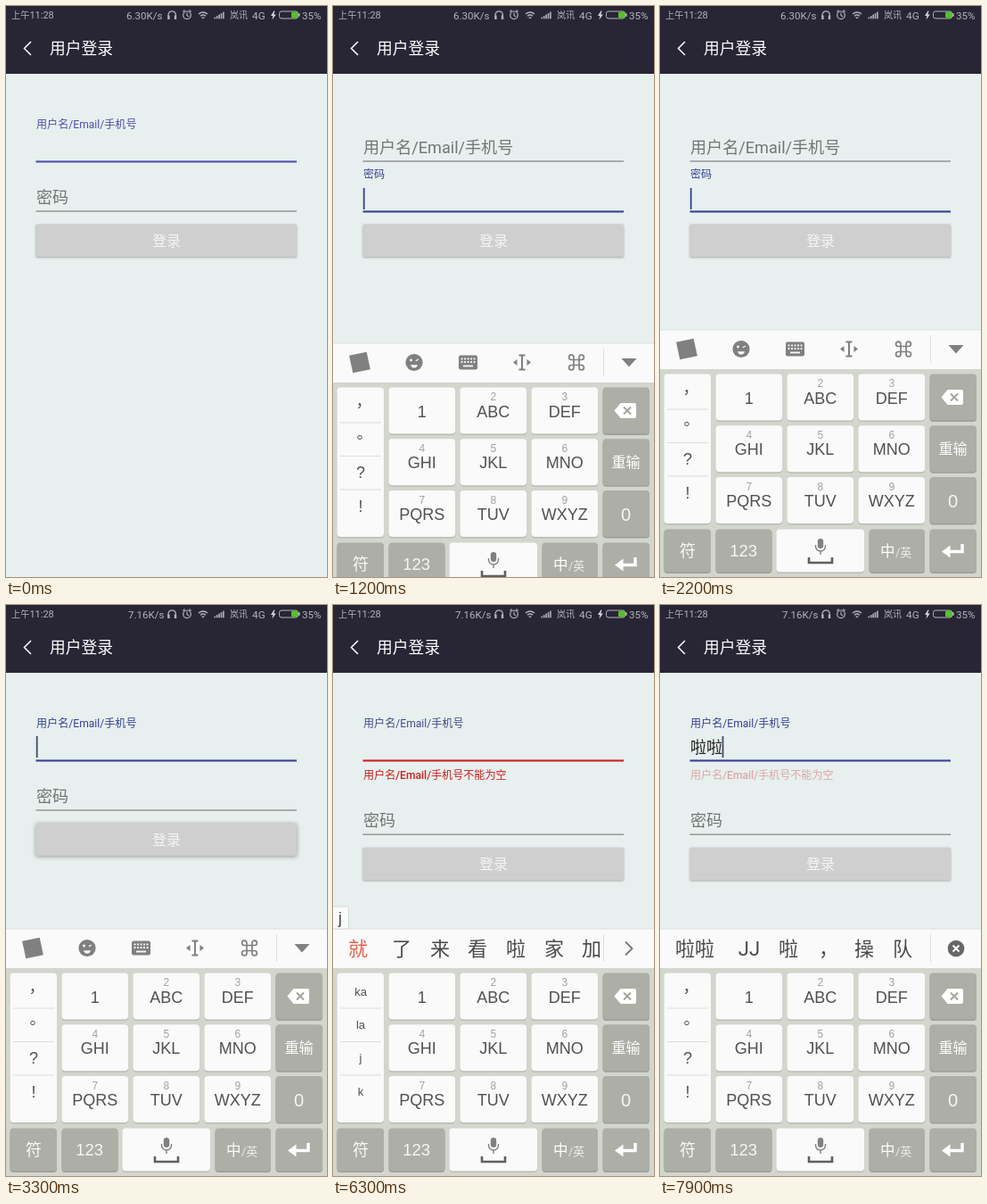
Write an HTML page that moves like this. It is 360 px wide and 640 px high and loops after 8000 ms.

```html
<!DOCTYPE html>
<html lang="zh-CN">
<head>
<meta charset="utf-8">
<title>用户登录</title>
<style>
html, body { margin: 0; width: 100%; height: 100%; overflow: hidden; background: #e7f0ee; }
svg { display: block; width: 360px; height: 640px; }
text { font-family: Roboto, "Noto Sans CJK SC", "Noto Sans CJK", sans-serif; white-space: pre; }
.key { font-family: "Liberation Sans", "Noto Sans CJK SC", "Noto Sans CJK", sans-serif; }
#error { font-weight: 500; }
#button rect { filter: drop-shadow(0 1px 1px rgba(0, 0, 0, .3)); }
#button.down rect { filter: drop-shadow(0 1.5px 2.5px rgba(0, 0, 0, .36)); }
</style>
</head>
<body>
<svg id="stage" viewBox="0 0 360 640"></svg>
<script>
const LOOP = 8000, STEP = 100;
const BLUE = '#36409a', INK = '#454b8c', RED = '#cc1f1f', GREY = '#727675', ICON = '#808080';

// y is the optical middle of the text
const text = (x, y, size, str, fill, o = {}) =>
  `<text x="${x}" y="${y + size * .37}" font-size="${size}" fill="${fill}"` +
  ` text-anchor="${o.anchor || 'middle'}" class="${o.cls || ''}" id="${o.id || ''}">${str}</text>`;
const left = (x, y, size, str, fill, id) => text(x, y, size, str, fill, { anchor: 'start', id });
const rect = (x, y, w, h, fill, extra = '') =>
  `<rect x="${x}" y="${y}" width="${w}" height="${h}" fill="${fill}" ${extra}/>`;
const path = (d, stroke, w = 1, fill = 'none') =>
  `<path d="${d}" fill="${fill}" stroke="${stroke}" stroke-width="${w}"/>`;
const circle = (x, y, r, fill, extra = '') =>
  `<circle cx="${x}" cy="${y}" r="${r}" fill="${fill}" ${extra}/>`;
const group = (id, body) => `<g id="${id}">${body}</g>`;

function statusBar() {
  const c = '#b4b3b9';
  let s = left(6, 10.5, 10.2, '上午<tspan font-size="11">11:28</tspan>', c);
  s += left(135, 10.5, 11.5, '', c, 'speed');
  s += path('M182 12V10a4.2 4.2 0 0 1 8.4 0v2', c, 1.2) + rect(181.2, 10.5, 2.4, 4.5, c) + rect(188.8, 10.5, 2.4, 4.5, c);
  s += path('M203 7.5V10.5L205 12M198.5 6.5l2-2M207.5 6.5l-2-2', c, 1.1) +
    circle(203, 10.3, 4.3, 'none', `stroke="${c}" stroke-width="1.2"`);
  s += path('M216 9q5-4 10 0M218 11.2q3-2.4 6 0', c, 1.4) + path('M219 12.4h4l-2 2.2z', 'none', 0, c);
  for (let i = 0; i < 5; i++) s += rect(233.5 + i * 2.4, 12.6 - i * 1.5, 1.6, 1.7 + i * 1.5, c);
  s += left(251, 10.5, 10, '岚讯', c) + left(276, 10.5, 11.8, '4G', c);
  s += path('M300.5 5.5l-3.5 5.4h2.4l-1 4.6 4.4-6h-2.6l1.4-4z', 'none', 0, '#d8d8dc');
  s += rect(306.5, 6, 21, 8, 'none', `rx="2.5" stroke="${c}"`) + rect(320, 6.5, 7.5, 7, '#55c02c', 'rx="1.5"') + rect(328, 8.2, 1.6, 3.6, c);
  return s + left(332, 10.5, 11.5, '35%', c);
}

function form() {
  return rect(33.5, 0, 292.5, 2, BLUE, 'id="lineUser"') +
    left(34, 0, 12, '用户名/Email/手机号', BLUE, 'labelUser') +
    left(34, 159, 18, '', '#222', 'typed') +
    left(34, 190.5, 12.1, '用户名/Email/手机号不能为空', RED, 'error') +
    group('lower',
      rect(33.5, 0, 292.5, 2, BLUE, 'id="linePass"') +
      left(34, 0, 12, '密码', BLUE, 'labelPass') +
      group('button', rect(33.5, 244.5, 292.5, 36.5, '#cfcfcf', 'rx="1.5"') +
        text(180, 263, 16, '登录', '#f2f6f5'))) +
    rect(34, 0, 1.8, 24, BLUE, 'id="cursor"');
}

function key(x, y, w, h, dark, id = '') {
  return rect(x, y + 1.4, w, h, dark ? '#9c9e96' : '#b8bcb3', 'rx="4"') +
    rect(x, y, w, h, dark ? '#adaea6' : '#f9faf9', `rx="4" id="${id}"`);
}
const keyText = (x, y, size, str, fill = '#505050') => text(x, y, size, str, fill, { cls: 'key' });

function tools() {
  let s = rect(20, 374.5, 20, 20, ICON, 'transform="rotate(-12 30 384.5)"');
  s += circle(91, 384.5, 9.6, ICON) + circle(87.5, 382, 1.4, '#f9f9f9') +
    path('M92.8 382.8l3-1.8', '#f9f9f9', 1.3) + path('M87 387.2h8q-1 3.4-4 3.4t-4-3.4z', 'none', 0, '#f9f9f9');
  s += rect(141, 376.5, 21, 16, ICON, 'rx="2"');
  for (let r = 0; r < 2; r++) for (let i = 0; i < 5; i++) s += rect(143.6 + i * 3.5, 379.5 + r * 3.6, 1.9, 1.9, '#f9f9f9');
  s += rect(146, 387.6, 11, 1.8, '#f9f9f9');
  s += path('M208.5 376.5h7M212 376.5v16M208.5 392.5h7', ICON, 2) +
    path('M206.5 381v7l-4.5-3.5zM217.5 381v7l4.5-3.5z', 'none', 0, ICON);
  const loops = [[-1, -1], [1, -1], [-1, 1], [1, 1]].map(([a, b]) =>
    `M${273 + a * 3} ${384.5 + b * 3}h${a * 2.7}a2.7 2.7 0 1 ${a === b ? 1 : 0} ${-a * 2.7} ${b * 2.7}z`).join('');
  s += path(loops + 'M270 381.5h6v6h-6z', ICON, 1.7);
  return s + path('M323.5 380h17l-8.5 9.5z', 'none', 0, ICON);
}

function keyboard() {
  let s = rect(0, 363, 360, 44, '#f9faf9') + rect(0, 362.5, 360, 1, '#dde2df') + rect(0, 407, 360, 233, '#d2d6cd');
  s += rect(303, 369, 1, 31, '#dedede');
  s += group('tools', tools()) + group('words', '');
  s += group('more', path('M328 377.5l7.5 7.5-7.5 7.5', '#757575', 1.8));
  s += group('close', circle(332, 385, 9.3, '#666') + path('M328.5 381.5l7 7M335.5 381.5l-7 7', '#fff', 1.9));
  s += group('compose', rect(-2, 338, 19.5, 25, '#f9faf9', 'rx="2" stroke="#d5dad7" id="composeBox"') +
    `<text id="composeText" class="key" x="6" y="357" font-size="18" fill="#444"></text>`);

  s += key(4.5, 412.5, 52.5, 167.5);
  for (const y of [451.5, 489, 526.5]) s += rect(8, y, 46, 1, '#dcdfdb');
  s += group('marks',
    `<text x="25.5" y="433.5" font-size="18" fill="#505050">，</text>` +
    `<text x="26.5" y="469.5" font-size="18" fill="#505050">。</text>` +
    keyText(31, 507.5, 18, '?') + keyText(31, 545, 18, '!'));
  s += group('syllables', ['ka', 'la', 'j', 'k'].map((v, i) => keyText(31, 433 + i * 37.3, 13, v)).join(''));

  ['1', 'ABC', 'DEF', 'GHI', 'JKL', 'MNO', 'PQRS', 'TUV', 'WXYZ'].forEach((name, i) => {
    const x = 62.5 + i % 3 * 80, y = 412.5 + Math.floor(i / 3) * 57.8;
    s += key(x, y, 74.5, 52, false, 'key' + name);
    if (i) s += keyText(x + 37.3, y + 10, 12, i + 1, '#a2a2a2');
    s += keyText(x + 37.3, y + 26.4, 18, name);
  });
  for (let i = 0; i < 3; i++) s += key(302.5, 412.5 + i * 57.8, 52.5, 52, true);
  s += path('M315.5 438.5l7-8.5h15.5q2 0 2 2v13q0 2-2 2h-15.5z', 'none', 0, '#fff') + path('M326 434.5l8 8M334 434.5l-8 8', '#a3a49c', 2);
  s += `<g font-weight="500">${text(328.5, 496.5, 16, '重输', '#fff')}</g>` + keyText(328.5, 554.5, 20, '0', '#f6f6f4');

  s += key(4.5, 586.5, 52.5, 48, true) + text(31, 610.5, 18, '符', '#f8f8f6');
  s += key(62.5, 586.5, 63, 48, true) + keyText(93.7, 610, 18.5, '123', '#f6f6f4');
  s += key(130.5, 586.5, 98.5, 48);
  s += rect(176.8, 597, 6.4, 11, ICON, 'rx="3.2"') + path('M174.5 604v1.5a5.5 5.5 0 0 0 11 0V604M180 611v4', ICON, 1.4);
  s += path('M167 618v6h26v-6', '#606060', 2.6);
  s += key(234.5, 586.5, 62.5, 48, true) + left(247, 610.5, 16.5, '中', '#fff') + left(264, 612, 13, '/英', '#ececea');
  s += key(302.5, 586.5, 52.5, 48, true);
  return s + path('M339 603v8.5h-15', '#fff', 3.4) + path('M325.5 604.5v14l-9.5-7z', 'none', 0, '#fff');
}

document.getElementById('stage').innerHTML =
  rect(0, 0, 360, 640, '#e7f0ee') + form() +
  rect(0, 0, 360, 76, '#282635') + statusBar() +
  path('M28 40l-7.5 7.5 7.5 7.5', '#fff', 1.5) + left(49, 47.6, 17.8, '用户登录', '#fff') +
  group('keyboard', keyboard());

const $ = id => document.getElementById(id);
const set = (id, attrs) => { for (const k in attrs) $(id).setAttribute(k, attrs[k]); };
const show = (id, on) => set(id, { visibility: on ? 'visible' : 'hidden' });
const ramp = (t, start, dur = 200) => Math.min(1, Math.max(0, (t - start) / dur));
const within = (t, a, b) => t >= a && t < b;

// [from, composed letters, [word, centre]...]
const WORDS = [
  [0, ''],
  [6000, 'j', ['就', 28], ['了', 77], ['来', 120], ['看', 162], ['啦', 205], ['家', 248], ['加', 290]],
  [6700, 'la', ['啦', 28], ['拉', 77], ['家', 120], ['卡', 162], ['加', 205], ['来', 248], ['辣', 290]],
  [7400, 'lala', ['啦啦', 39], ['拉拉', 100], ['啦', 157], ['拉', 200], ['家', 243], ['卡', 285]],
  [7800, '', ['啦啦', 39], ['JJ', 100], ['啦', 144], ['，', 189], ['操', 229], ['队', 272]]
];
let shown = null;

function label(id, y, up, color) {
  const shrink = 1 - (1 - up) ** 6.6;
  const size = 18.1 - 6 * shrink;
  set(id, { 'font-size': size, y: y - 25.6 * up + size * .37, fill: color });
}
function line(id, y, on, color) {
  set(id, { y: y - .6, height: on ? 2.1 : 1.2, fill: on ? color : '#7f8483' });
}

function cursor(t, onPass) {
  const phase = t < 800 ? t + 500 : onPass ? t - 1000 : t < 5700 ? t - 900 : t - 700;
  show('cursor', t === 900 || phase % 1000 < 500);
  set('cursor', { x: t >= 7800 ? 69.6 : 33.8, y: onPass ? 204 : 147, fill: onPass ? BLUE : '#444a68' });
}

function candidates(t) {
  const current = WORDS.filter(w => w[0] <= t).pop();
  if (current !== shown) {
    shown = current;
    const [, letters, ...words] = current;
    $('words').innerHTML = words.map(([w, x], i) =>
      text(x, 385, 22, w, letters && !i ? '#e4604c' : '#4a4a4a')).join('');
    $('composeText').textContent = letters;
    set('composeBox', { width: 9.5 + 10 * Math.max(1, letters.length) });
  }
  const composing = within(t, 6000, 7800);
  show('tools', t < 6000);
  show('more', composing);
  show('compose', composing);
  show('syllables', composing);
  show('marks', !composing);
  show('close', t >= 7800);
}

function render(t) {
  const onPass = within(t, 800, 2400);
  const failed = t >= 3500, done = t >= 7800;
  const accent = t < 800 ? '#4d4fae' : BLUE;

  $('speed').textContent = t < 2500 ? '6.30K/s' : '7.16K/s';
  set('speed', { x: t < 2500 ? 135 : 137 });

  const userUp = t < 2000 ? 1 - ramp(t, 760) : ramp(t, 2400);
  const passUp = t < 2000 ? ramp(t, 880) : 1 - ramp(t, 2400);
  label('labelUser', 158, userUp, onPass ? GREY : failed && !done ? INK : accent);
  label('labelPass', 214, passUp, onPass && t > 900 ? BLUE : GREY);
  line('lineUser', 174, !onPass, failed && !done ? RED : accent);
  line('linePass', 230, onPass, BLUE);

  set('error', { opacity: done ? 1 - ramp(t, 7770) : ramp(t, 3500) });
  set('lower', { transform: `translate(0 ${failed ? 27.2 : 0})` });
  $('button').classList.toggle('down', within(t, 3200, 3500));
  $('typed').textContent = done ? '啦啦' : '';
  cursor(t, onPass);

  const drop = t < 900 ? 280 : t < 1800 ? Math.round(207 * Math.exp((900 - t) / 113)) : 0;
  set('keyboard', { transform: `translate(0 ${drop})` });
  show('keyboard', t >= 900);
  candidates(t);
  const press = (id, on) => set(id, { fill: on ? '#dfe2de' : '#f9faf9' });
  press('keyJKL', t === 5900 || t === 7200);
  press('keyABC', t === 6600 || t === 7300);
}

function tick() {
  const t = performance.now() % LOOP;
  render(Math.floor(t / STEP) * STEP);
  requestAnimationFrame(tick);
}
tick();
</script>
</body>
</html>
```
